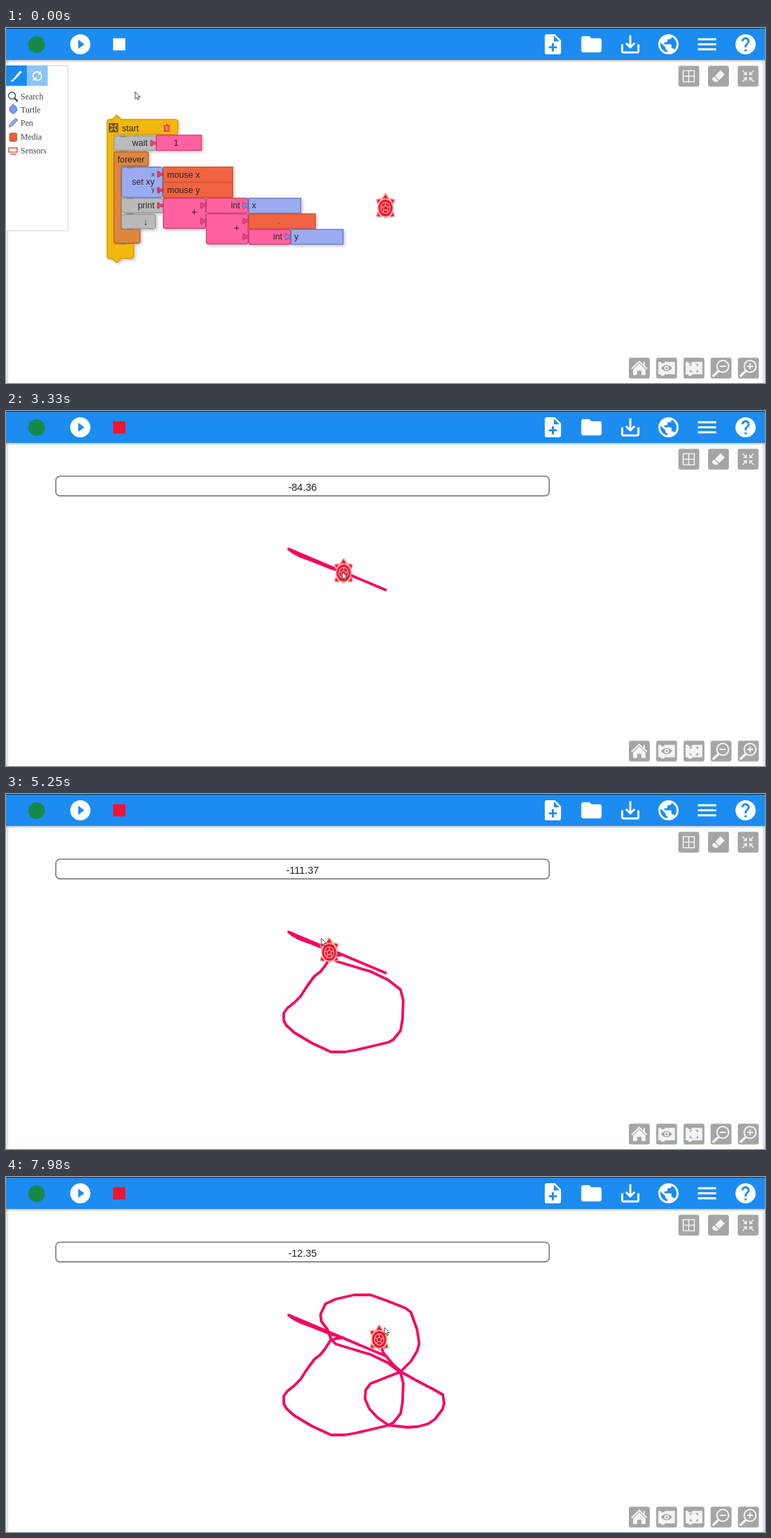
Recreate the animation shown at these times as an HTML page. Size 1093x512 px, loop 8 s.

```html
<!DOCTYPE html>
<html lang="en">
<head>
<meta charset="utf-8">
<title>Turtle follows the mouse</title>
<style>
html, body { margin: 0; width: 100%; height: 100%; overflow: hidden; background: #fff; }
svg { display: block; width: 100vw; height: 100vh; }
text { font-family: "Liberation Sans", Arial, sans-serif; }
#blocks text { font-size: 12.5px; fill: #262626; }
#palette text { font: 12px "Liberation Serif", serif; fill: #444; }
</style>
</head>
<body>
<svg viewBox="0 0 1093 512">
  <defs>
    <g id="turtle">
      <g fill="#f9a39c" stroke="#f9a39c" stroke-width="3" stroke-linejoin="round">
        <path d="M0-18.5L-4.5-11H4.5ZM0 15.5L-2 13H2Z"/>
        <path id="feet" d="M-12-10L-7.500-11L-11-5.500ZM12-10L7.500-11L11-5.500ZM-12 13L-7.500 14L-11 8.500ZM12 13L7.500 14L11 8.500Z"/>
        <ellipse cy="1.500" rx="10" ry="12"/>
      </g>
      <g fill="#f0142f">
        <path d="M0-18L-4-11.500Q0-13.500 4-11.500Z"/>
        <use href="#feet"/>
        <ellipse cy="1.500" rx="10" ry="12"/>
      </g>
      <g fill="none" stroke="#f9a39c" stroke-width="1.300">
        <ellipse cy="1.500" rx="6.800" ry="8"/>
        <path d="M0-2L3.400.6L2.100 4.700H-2.100L-3.400.6ZM0-2V-6.500M3.400.6L6.500-.8M2.100 4.700L4.200 8M-2.100 4.700L-4.200 8M-3.400.6L-6.500-.8"/>
      </g>
    </g>
    <filter id="soft" x="-5%" y="-5%" width="112%" height="112%"><feDropShadow dx="2" dy="2" stdDeviation="2" flood-opacity=".22"/></filter>
    <filter id="under" x="0" y="0" width="100%" height="130%"><feDropShadow dx="0" dy="1.500" stdDeviation="1.500" flood-opacity=".3"/></filter>
  </defs>
  <rect width="1093" height="512" fill="#fff"/>
  <path d="M0 46H3.500V512H0ZM1089.500 46H1093V512H1089.500Z" fill="#e4e4e4"/>
  <g id="blocks"><g id="stack" filter="url(#soft)"></g></g>
  <g id="palette">
    <rect x="-1" y="54.500" width="90" height="238" fill="#fff" stroke="#d4d4d4"/>
    <rect y="54" width="30" height="29.500" fill="#1a8cf0"/>
    <rect x="30" y="54" width="30" height="29.500" fill="#8cc5f8"/>
    <path d="M10 73.500L20.500 61.500L23 63.500L13 74.500ZM7 77.500Q8.500 72 12 75.500Q10 78 7 77.500Z" fill="#fff"/>
    <path d="M39.500 71A5.500 5.500 0 0 1 48 64.500M50.500 67.500A5.500 5.500 0 0 1 42 74" fill="none" stroke="#fff" stroke-width="1.700"/>
    <path d="M50.500 62V67H45.500ZM39.500 76.500V71.500H44.500Z" fill="#fff"/>
    <g fill="none" stroke="#555" stroke-width="1.500"><circle cx="8.500" cy="97.500" r="5"/><path d="M12 101L17 106" stroke-width="2.500"/></g>
    <path d="M10 110L15 114L16 119L11 124L6 121L5 115Z" fill="#8396ec" stroke="#5d71d8"/>
    <path d="M4 143L6 138L14 130L17 133L9 141Z" fill="#93a5f2" stroke="#6f82dc"/>
    <rect x="5" y="151.500" width="10.500" height="12" rx="2" fill="#f0603c" stroke="#d94e2c"/>
    <path d="M4 173H16V179H4ZM6 182H15" fill="none" stroke="#e8573a" stroke-width="1.600"/>
  </g>
  <polyline id="trail" fill="none" stroke="#f5055f" stroke-width="3.800" stroke-linecap="round" stroke-linejoin="round"/>
  <use id="hero" href="#turtle"/>
  <g id="buttons" fill="#f4f4f4"></g>
  <g id="message">
    <rect x="71.700" y="94" width="710.600" height="28.400" rx="6" fill="#fff" stroke="#777" stroke-width="1.600"/>
    <text id="label" x="427" y="114.500" font-size="14.500" text-anchor="middle" fill="#222"></text>
  </g>
  <rect y="1" width="1093" height="45" fill="#1a8cf0" filter="url(#under)"/>
  <rect width="1093" height="1" fill="#0c2a45"/>
  <circle cx="44" cy="24" r="12" fill="#158a48"/>
  <rect id="hover" x="80" y="1" width="55.500" height="45" fill="#187ad2"/>
  <g id="icons" fill="#fff"></g>
  <circle id="ring" cx="107" cy="31" r="6" fill="#f9b4b4" fill-opacity=".55" stroke="#f05a62" stroke-width="2.500"/>
  <g id="tip">
    <rect x="91" y="57" width="33" height="28" rx="14" fill="#373031"/>
    <text x="107.500" y="75" text-anchor="middle" fill="#fff" style="font:11px Roboto,sans-serif">Play</text>
  </g>
  <path id="cursor" d="M0 0V10.300L2.400 8.100L4 11.700L5.600 11L4 7.500H7.200Z" fill="#fff" stroke="#333" stroke-width=".9"/>
</svg>
<script>
const $ = id => document.getElementById(id);
const add = (id, html) => $(id).insertAdjacentHTML('beforeend', html);

// toolbar
const disc = 'M12 2C6.480 2 2 6.480 2 12s4.480 10 10 10 10-4.480 10-10S17.520 2 12 2z';
const icon = (x, d, id = '') =>
  add('icons', `<path ${id && `id="${id}"`} transform="translate(${x - 17.5} 6) scale(1.46)" d="${d}"/>`);
icon(107, disc + 'm-2 14.500v-9l6 4.500-6 4.500z');
icon(163, 'M6 6h12v12H6z', 'stop');
icon(787.5, 'M14 2H6c-1.100 0-2 .9-2 2v16c0 1.100.9 2 2 2h12c1.100 0 2-.9 2-2V8l-6-6zm2 14h-3v3h-2v-3H8v-2h3v-3h2v3h3v2zm-3-7V3.500L18.500 9H13z');
icon(843, 'M10 4H4c-1.100 0-2 .9-2 2v12c0 1.100.9 2 2 2h16c1.100 0 2-.9 2-2V8c0-1.100-.9-2-2-2h-8l-2-2z');
icon(899, 'M19 12v7H5v-7H3v7c0 1.100.9 2 2 2h14c1.100 0 2-.9 2-2v-7h-2zm-6 .67l2.590-2.580L17 11.500l-5 5-5-5 1.410-1.410L11 12.670V3h2z');
icon(954, disc + 'm-1 17.930c-3.950-.49-7-3.850-7-7.930 0-.62.08-1.210.21-1.790L9 15v1c0 1.100.9 2 2 2v1.930zm6.900-2.540c-.26-.81-1-1.390-1.900-1.390h-1v-3c0-.55-.45-1-1-1H8v-2h2c.55 0 1-.45 1-1V7h2c1.100 0 2-.9 2-2v-.41c2.930 1.190 5 4.060 5 7.410 0 2.080-.8 3.970-2.100 5.390z');
icon(1009.5, 'M3 18h18v-2H3v2zm0-5h18v-2H3v2zm0-7v2h18V6H3z');
icon(1065, disc + 'm1 17h-2v-2h2v2zm2.070-7.750l-.9.92C13.450 12.900 13 13.500 13 15h-2v-.5c0-1.100.45-2.100 1.170-2.830l1.240-1.260c.37-.36.59-.86.59-1.410 0-1.100-.9-2-2-2s-2 .9-2 2H8c0-2.210 1.790-4 4-4s4 1.790 4 4c0 .88-.36 1.680-.93 2.250z');

// grey stage buttons
const button = (x, y, glyph) => add('buttons',
  `<g transform="translate(${x} ${y})"><rect x="-15" y="-15" width="30" height="30" rx="3" fill="#a5a5a5"/>${glyph}</g>`);
const line = (d, w = 1.5) => `<path d="${d}" fill="none" stroke="#f4f4f4" stroke-width="${w}"/>`;
const brick = '<path d="M-12-9H-8V-7H-3V-9H12V9H-3V11H-8V9H-12Z"/>';
const lens = '<circle cx="2.500" cy="-2.500" r="8.500" fill="none" stroke="#f4f4f4" stroke-width="2"/>' + line('M-3.500 4L-12 12', 3.5);
button(983.3, 69.5, line('M-8-8H8V8H-8ZM-8 0H8M0-8V8'));
button(1026, 69.5, '<path d="M3-8.500L9-2.500L1 5.500L-5-.5ZM-6 .5L0 6.500L-2 8H-6L-9 5V3Z"/>');
button(1068.7, 69.5, line('M-8-8L-2.500-2.500V-6.500M-2.500-2.500H-6.500M8-8L2.500-2.500V-6.500M2.500-2.500H6.500M-8 8L-2.500 2.500V6.500M-2.500 2.500H-6.500M8 8L2.500 2.500V6.500M2.500 2.500H6.500'));
button(912, 490.5, '<path d="M0-7L9 2V10H3V4H-3V10H-9V2Z"/>' + line('M-11 1L0-9.500L11 1M7-9V-4', 2));
button(951.3, 490.5, brick + '<path d="M-8 0Q0-9 8 0Q0 9-8 0Z" fill="#a5a5a5"/><circle r="3.300"/><circle r="1.600" fill="#a5a5a5"/>');
button(990.7, 490.5, brick + '<path d="M-6-6H-2L-6-2ZM6-6H2L6-2ZM-6 6H-2L-6 2ZM6 6H2L6 2Z" fill="#a5a5a5"/>');
button(1029.7, 490.5, lens + line('M-2-2.500H7', 2));
button(1069, 490.5, lens + line('M-2-2.500H7M2.500-7V2', 2));

['Search', 'Turtle', 'Pen', 'Media', 'Sensors'].forEach((name, i) =>
  add('palette', `<text x="21" y="${[103, 121.5, 141, 161, 181][i]}">${name}</text>`));

// program blocks
const paint = {
  yellow: ['#f1b80a', '#d09c00'], grey: ['#bababa', '#989898'], pink: ['#ff629f', '#cf3f78'],
  brown: ['#dd8641', '#a8622b'], blue: ['#9babef', '#6678cf'], red: ['#f0643f', '#c54f30']
};
const shape = (color, d) => add('stack',
  `<path d="${d}" fill="${paint[color][0]}" stroke="${paint[color][1]}" stroke-width="1.300" stroke-linejoin="round"/>`);
const box = (color, x, y, r, b, rx = 0) => add('stack',
  `<rect x="${x + .5}" y="${y + .5}" width="${r - x - 1}" height="${b - y - 1}" rx="${rx}" fill="${paint[color][0]}" stroke="${paint[color][1]}" stroke-width="1.300"/>`);
const word = (s, x, y, anchor = 'start', size = 12.5) => add('stack',
  `<text x="${x}" y="${y}" text-anchor="${anchor}" style="font-size:${size}px">${s}</text>`);
const plug = (x, y, color = '#e8427f') => add('stack',
  `<path d="M${x - 8} ${y - 4}h3v2h5v4h-5v2h-3z" fill="${color}" stroke="#a8305f" stroke-width=".7"/>`);
const notch = (x, y) => add('stack',
  `<path d="M${x} ${y}h12l-2 2.500h-8z" fill="#777" fill-opacity=".55"/>`);

shape('yellow', 'M149 132H153L159.500 125.500L166 132H244Q247.500 132 247.500 135V150Q247.500 153.500 244 153.500H156V311H184V329Q184 332.500 180 332.500H166L159.500 338.500L153 332.500H149Q145.500 332.500 145.500 329V136Q145.500 132 149 132Z');
shape('brown', 'M158 178.500H202Q205 178.500 205 181V196Q205 199 202 199H166V290H193V307Q193 310.500 190 310.500H159Q155.500 310.500 155.500 307V181Q155.500 178.500 158 178.500Z');
box('grey', 155, 155, 217, 177, 4);
box('blue', 166, 200, 226, 245, 4);
box('grey', 166, 245, 227, 267, 4);
box('grey', 166, 268, 216, 290, 4);
box('pink', 216, 154, 282, 177);
box('red', 226, 200, 327, 223);
box('red', 226, 222, 327, 245);
box('pink', 226, 245, 288, 289.5, 3);
box('pink', 288, 245, 349, 267.5, 3);
box('blue', 349, 245, 425, 267.5);
box('pink', 288, 267.5, 349, 312, 3);
box('red', 349, 267.5, 446, 290);
box('pink', 349, 290, 410, 312.5, 3);
box('blue', 410, 290, 486, 312.5);
for (const [x, y] of [[163, 155], [163, 177], [163, 310], [173, 200], [173, 244], [173, 267], [173, 289]]) notch(x, y);
plug(216, 166); plug(226, 256);
plug(226, 211, '#d8405a'); plug(226, 234, '#d8405a');
plug(288, 256); plug(288, 278.5); plug(349, 278.5); plug(349, 301);
plug(349, 256, '#7f90e8'); plug(410, 301, '#7f90e8');
add('stack', `<rect x="148" y="137" width="13.500" height="13.500" rx="1" fill="#7d5c06"/>
  <path d="M150.500 139.500l3 3m5.500-3l-3 3m-5.500 5.500l3-3m5.500 3l-3-3" stroke="#f6dd8c" stroke-width="1.300"/>
  <g fill="none" stroke="#e8252f" stroke-width="1.300"><ellipse cx="231.500" cy="144.500" rx="3.500" ry="4.300" fill="#f4796a"/><path d="M231.500 138v2M227 140l2 1.500M236 140l-2 1.500M227 149.500l2-1.500M236 149.500l-2-1.500"/></g>`);
word('start', 167, 149);
word('wait', 204, 170, 'end');
word('1', 245, 169.5, 'middle');
word('forever', 160.5, 194);
word('set xy', 214, 226, 'end');
word('x', 214, 213.5, 'end', 9);
word('y', 214, 236, 'end', 9);
word('mouse x', 232, 215.5);
word('mouse y', 232, 238);
word('print', 214, 260, 'end');
word('↓', 201, 284, 'middle', 13);
word('+', 271, 270, 'middle', 14);
word('int', 337, 260, 'end');
word('x', 354, 260);
word('+', 332, 293, 'middle', 14);
word('.', 393, 282, 'middle');
word('int', 398, 305, 'end');
word('y', 415, 305);

// turtle route: each leg ends at its time, with even speed along it
const home = [546.5, 258], begin = 2900;
const legs = [
  [3315, '412 203 418 206.500 425 210 440 215.500 455 221.500 470 227.500 486.200 232'],
  [3330, '486.200 232'],
  [3410, '484 232.200'],
  [4320, '475 233 467 236 460 247 453 256 444 263 435 275 424 292 415 301 405 309 400 316 400 327 404 334 415 344 440 359 468 372 488 372 505 369'],
  [4515, '522 365 551 358 558 354 568.200 341.200'],
  [4530, '568.200 341.200'],
  [5130, '571 325 572 297 568 282 550 268 525 256 495 247'],
  [5955, '475 241 468 234 463 220 454 208 453 198 460 183 475 176 502 170 525 170 550 179 575 189 583 195 588 209 592 220 594.600 237.200'],
  [5970, '594.700 241.500'],
  [6750, '592 251 583 266 568 281 545 290 525 298 518 307 517 320 523 334 535 347 551 358 578 361'],
  [7125, '593 360 608 356 618 349 628.600 335'],
  [7140, '628.600 335'],
  [7560, '631 326 629 314 615 306 590 293'],
  [7965, '569 281 557 270 543 253 537.300 233'],
  [7980, '537.300 233'],
  [8050, '545 217']
];
const route = [[begin, 407, 199]];
for (const [end, list] of legs) {
  let [t, x, y] = route[route.length - 1], sum = 0;
  const start = t, n = list.split(' ').map(Number), part = [];
  for (let i = 0; i < n.length; i += 2) {
    sum += Math.hypot(n[i] - x, n[i + 1] - y);
    [x, y] = [n[i], n[i + 1]];
    part.push([sum, x, y]);
  }
  for (const [d, px, py] of part) route.push([start + (end - start) * (sum ? d / sum : 1), px, py]);
}

const at = (keys, t) => {
  let i = keys.findIndex(k => k[0] > t);
  if (i < 0) return keys[keys.length - 1].slice(1);
  if (i === 0) return keys[0].slice(1);
  const [a, ax, ay] = keys[i - 1], [b, bx, by] = keys[i], f = (t - a) / (b - a);
  return [ax + (bx - ax) * f, ay + (by - ay) * f];
};

const lead = 70;
const approach = [
  [0, 186, 92], [130, 186, 92], [131, 185, 91], [280, 185, 91], [700, 168, 85], [1070, 152, 79],
  [1400, 131, 56], [1750, 110, 33], [1880, 107, 30], [1990, 107, 30], [2270, 184, 66],
  [2690, 380, 178], [begin - lead, 407, 199]
];

const show = (id, on) => $(id).style.display = on ? '' : 'none';
const move = (id, [x, y]) => $(id).setAttribute('transform', `translate(${x.toFixed(2)} ${y.toFixed(2)})`);

function draw(t) {
  const running = t >= 1960, moving = t >= begin;
  const spot = moving ? at(route, t) : home;
  show('blocks', !running);
  show('palette', !running);
  show('hover', t >= 1520 && t < 2460);
  show('tip', t >= 1620 && t < 2460);
  show('ring', running && t < 2400);
  show('message', moving);
  show('trail', moving);
  $('stop').setAttribute('fill', running ? '#f3122f' : '#fff');
  move('hero', spot);
  move('cursor', t < begin - lead ? at(approach, t) : at(route, t + lead));
  if (!moving) return;
  const done = route.filter(k => k[0] <= t).map(k => k.slice(1));
  $('trail').setAttribute('points', [home, ...done, spot].join(' '));
  const [x, y] = at(route, t - 15);
  $('label').textContent = Math.trunc((x - 546) / .711) + '.' + Math.trunc((258 - y) / .711);
}

const origin = performance.now();
function tick() {
  draw((performance.now() - origin) % 8000);
  requestAnimationFrame(tick);
}
tick();
</script>
</body>
</html>
```
